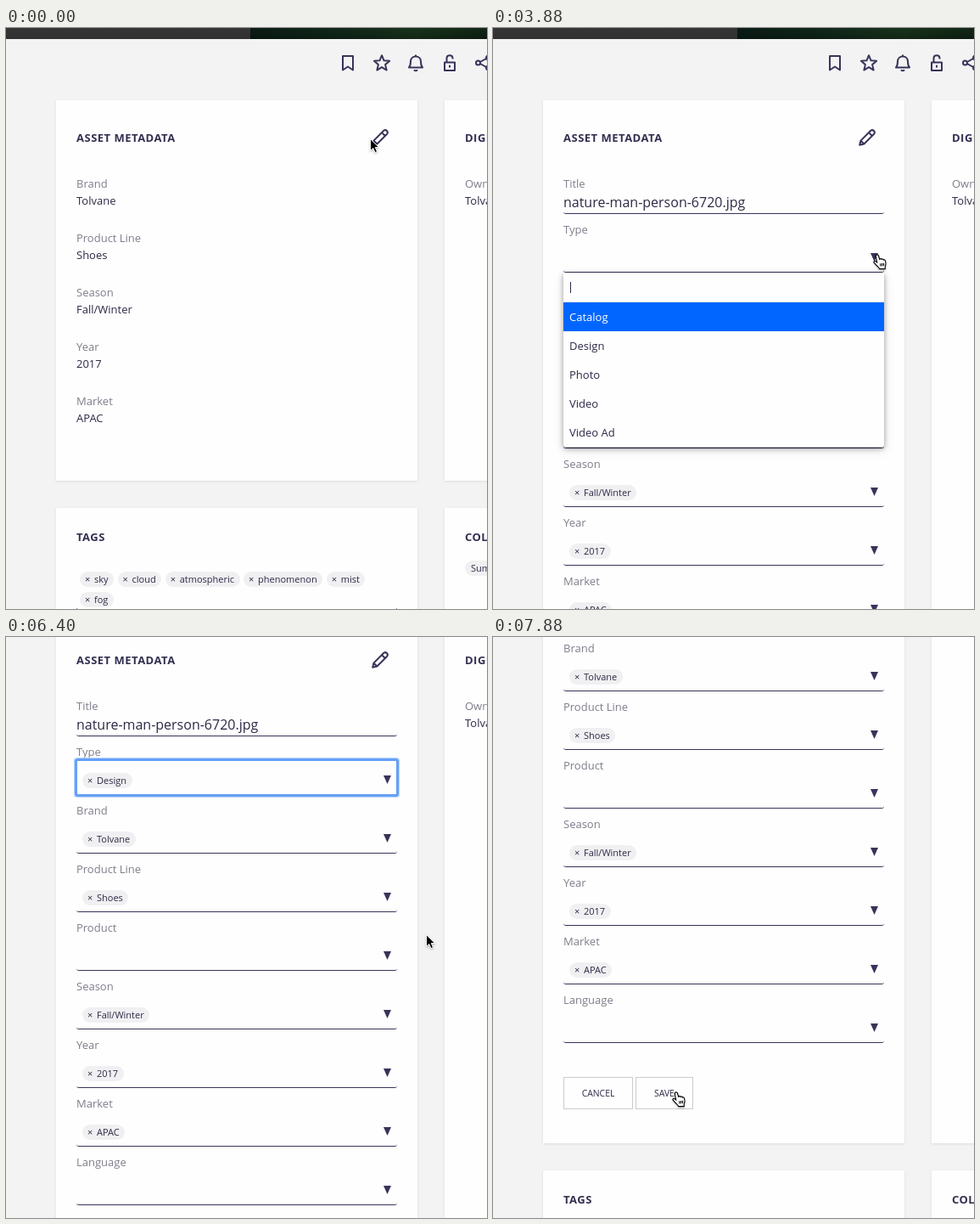
Animation, 567 px wide and 684 px high, one loop 8000 ms. Source, as an HTML page:

```html
<!DOCTYPE html>
<html lang="en">
<head>
<meta charset="utf-8">
<title>Asset metadata editor</title>
<style>
html, body { margin: 0; width: 100%; height: 100%; overflow: hidden; background: #f3f3f3; }
body { position: relative; font: 13px/20px "Open Sans", sans-serif; color: #2d2a45; }
#page { position: absolute; left: 0; top: 0; width: 567px; height: 1400px; }
#page div, #page svg, #cursors svg { position: absolute; }
.text { white-space: pre; height: 20px; }
.head { font-weight: 700; letter-spacing: .5px; color: #322f50; }
.label { color: #7f7d8b; }
.title { font-size: 16px; }
.card { background: #fefefe; box-shadow: 0 1px 3px rgba(0, 0, 0, .1); }
.field { box-sizing: border-box; left: 83px; width: 378px; border-bottom: 1px solid #37345a; border-radius: 3px; }
.arrow { left: 445px; width: 9px; height: 10px; background: #37345a; clip-path: polygon(0 0, 100% 0, 50% 100%); }
.chips { display: flex; gap: 4.5px; }
.chips span { height: 18px; line-height: 18px; padding: 0 6.5px 0 17px; border-radius: 9px; background: #f0f0f2; font-size: 11px; position: relative; }
.chips span::before { content: "×"; position: absolute; left: 6px; }
.chips .plain { padding-left: 7px; }
.chips .plain::before { content: none; }
.button { box-sizing: border-box; height: 38px; border: 1px solid #ccc; font-size: 10.4px; line-height: 36px; text-align: center; }
#ring { left: 81px; top: 245px; width: 376px; height: 39px; border: 3px solid #65a0f8; border-radius: 3px; box-shadow: 0 0 1px 1px #b5d1fb; }
#menu { left: 83px; top: 288px; width: 378px; background: #fefefe; border-radius: 0 0 3px 3px;
  box-shadow: 0 2px 6px rgba(0, 0, 0, .35), 0 4px 14px rgba(0, 0, 0, .1); }
#search { box-sizing: border-box; width: 378px; height: 35px; border-bottom: 1px solid #ebebeb; }
#caret { left: 8px; top: 11px; width: 1px; height: 13px; background: #2d2a45; }
.item { box-sizing: border-box; width: 378px; height: 34px; line-height: 34px; padding-left: 7px; }
.item.on { background: #06f; color: #fff; }
.icon { fill: none; stroke: #37345a; stroke-width: 2; stroke-linejoin: round; overflow: visible; }
#cursors svg { left: 0; top: 0; overflow: visible; filter: drop-shadow(0 1px 1px rgba(0, 0, 0, .3)); }
</style>
</head>
<body>
<div id="page"></div>
<div id="cursors">
  <svg id="pointer" width="12" height="18"><path d="M0 .5V14.5L3.3 11.5 5.5 16.6 8 15.5 5.8 10.6H10.2Z" fill="#000" stroke="#fff"/></svg>
  <svg id="hand" width="16" height="19"><path d="M3.9 1.2C4.9.4 6.1 1 6.4 2L7.7 6.2C8.3 5.4 9.7 5.5 10.1 6.4 10.9 5.8 12.1 6.1 12.4 7 13.3 6.6 14.2 7.1 14.4 8L15 11C15.2 12.7 14.4 13.6 14.2 15V17.6H7.6C7 16 5 14.6 3.6 12.8L1 9.9C.5 8.9 1.7 8 2.8 8.6L4.7 10 3.3 2.6C3.2 2 3.4 1.6 3.9 1.2ZM8.6 11.3 9 14.5M10.5 11 10.8 14.3M12.4 10.8 12.6 14" fill="#fff" stroke="#000" stroke-width="1.1"/></svg>
</div>
<script>
const LOOP = 8000;
const GROWTH = 356;
const BRAND = "Tolvane";

// Each table row is a start time followed by the values held from then on.
const CURSOR = [
  [0, "pointer", 429.5, 130], [590, "pointer", 432, 131], [740, "hand", 434, 131],
  [2840, "hand", 434, 152], [2990, "hand", 445, 238], [3130, "hand", 448, 266],
  [4480, "hand", 448, 274], [4630, "hand", 444, 302], [4780, "hand", 432, 343],
  [4930, "hand", 417, 368], [5060, "hand", 411, 371], [5210, "hand", 413, 370],
  [5660, "pointer", 472, 356], [5810, "pointer", 495.5, 350],
  [7300, "pointer", 488, 355], [7450, "pointer", 425, 400], [7600, "pointer", 315, 478],
  [7750, "hand", 224, 531], [7880, "hand", 211, 535]
];
const SCROLL = [[0, 0], [6250, 30], [6400, 102], [6550, 176], [6700, 232], [6850, 270], [7000, 289], [7150, 292], [7300, 293]];
const FORM = [[0, 0], [1640, .4], [1790, .75], [1940, .93], [2090, 1]];
const MENU = [[0, "closed"], [3580, "loading"], [3880, "Catalog"], [4930, "Design"], [5210, "closed"]];
const CARET = [[0, 1], [4030, 0], [4480, 1], [5060, 0]];
const RING = [[0, 0], [3430, 1], [3580, 0], [5210, 1]];
const CHOSEN = 5210;

const page = document.getElementById("page");

function add(parent, cls, style = {}, text = "") {
  const el = document.createElement("div");
  el.className = cls;
  el.textContent = text;
  for (const key in style) {
    const v = style[key];
    el.style[key] = typeof v === "number" ? v + "px" : v;
  }
  parent.append(el);
  return el;
}

const write = (parent, x, mid, text, cls = "") =>
  add(parent, "text " + cls, { left: x, top: mid - 10 }, text);

function chips(parent, x, mid, names, cls = "") {
  const row = add(parent, "chips", { left: x, top: mid - 9 });
  for (const name of names) {
    const chip = document.createElement("span");
    chip.className = cls;
    chip.textContent = name;
    row.append(chip);
  }
  return row;
}

function icon(x, y, d) {
  page.insertAdjacentHTML("beforeend",
    `<svg class="icon" style="left:${x}px;top:${y}px" width="22" height="22"><path d="${d}"/></svg>`);
}

function starPath(r, inner) {
  const points = Array.from({ length: 10 }, (_, i) => {
    const a = i * Math.PI / 5, s = i % 2 ? inner : r;
    return (10 + s * Math.sin(a)).toFixed(2) + " " + (10.8 - s * Math.cos(a)).toFixed(2);
  });
  return "M" + points.join("L") + "Z";
}

// Banner and toolbar
add(page, "", { left: 0, top: 0, width: 288, height: 13, background: "linear-gradient(#363636, #303030)" });
add(page, "", { left: 288, top: 0, width: 279, height: 13,
  background: "linear-gradient(rgba(0,0,0,.1), rgba(0,0,0,.35)), linear-gradient(90deg, #0c2018, #14301f 45%, #1b3a1e 70%, #142a18)" });
icon(396, 32, "M1 1H13V17.5L7 13.5 1 17.5Z");
icon(433, 31, starPath(9.6, 4.3));
icon(473, 31, "M2 15.5H18C16.5 14 16 12 16 8.5 16 5 13.5 2.5 10 2.5S4 5 4 8.5C4 12 3.5 14 2 15.5ZM10 .5V2.5M8 18.3C9 19.6 11 19.6 12 18.3");
icon(513, 31, "M4 9.5H16V19H4ZM6.5 9.5V4.5C6.5 0 13.5 0 13.5 4.5V5.5M10 12.8V15.6");
icon(553, 31, "M6 10A2.5 2.5 0 1 1 1 10 2.5 2.5 0 1 1 6 10ZM6 9 13 5M6 11 13 15M18 4A2.5 2.5 0 1 1 13 4 2.5 2.5 0 1 1 18 4ZM18 16A2.5 2.5 0 1 1 13 16 2.5 2.5 0 1 1 18 16Z");

// Upper cards
const tall = [59, 517].map(x => add(page, "card", { left: x, top: 85, width: 426, height: 448 }));
write(page, 83, 129, "ASSET METADATA", "head");
write(page, 541, 129, "DIGITAL RIGHTS", "head");
write(page, 541, 183, "Owner", "label");
write(page, 541, 203, BRAND);
icon(431, 119, "M1.2 18.8 2.5 13.6 14.3 1.8C16.8-.2 20.2 3.2 18.2 5.7L6.4 17.5ZM12 4.1 15.9 8M2.5 13.6 6.4 17.5");

// Lower cards
const lower = add(page, "", { left: 0, top: 0 });
for (const x of [59, 517]) add(lower, "card", { left: x, top: 565, width: 426, height: 400 });
write(lower, 83, 599, "TAGS", "head");
write(lower, 541, 599, "COLLECTIONS", "head");
add(lower, "field", { top: 640, height: 45 });
chips(lower, 87, 648.5, ["sky", "cloud", "atmospheric", "phenomenon", "mist"]);
chips(lower, 87, 672.5, ["fog"]);
chips(lower, 541, 635.5, ["Summer"], "plain");

// Read-only view
const view = add(page, "", { left: 0, top: 0 });
[["Brand", BRAND], ["Product Line", "Shoes"], ["Season", "Fall/Winter"], ["Year", "2017"], ["Market", "APAC"]]
  .forEach(([name, value], i) => {
    write(view, 83, 183 + 64 * i, name, "label");
    write(view, 83, 203 + 64 * i, value);
  });

// Edit form
const form = add(page, "", { left: 0, top: 0 });
write(form, 83, 183, "Title", "label");
write(form, 83, 205, "nature-man-person-6720.jpg", "title");
add(form, "field", { top: 190, height: 29 });
let typeChip;
[["Type", "Design"], ["Brand", BRAND], ["Product Line", "Shoes"], ["Product"], ["Season", "Fall/Winter"],
  ["Year", "2017"], ["Market", "APAC"], ["Language"]].forEach(([name, value], i) => {
  const y = 237 + 69 * i;
  write(form, 83, y, name, "label");
  add(form, "field", { top: y + 11, height: 40 });
  add(form, "arrow", { top: y + 28 });
  const chip = value && chips(form, 90, y + 34, [value]);
  if (name === "Type") typeChip = chip;
});
add(form, "button", { left: 83, top: 811, width: 82 }, "CANCEL");
add(form, "button", { left: 168, top: 811, width: 68 }, "SAVE");
const ring = add(form, "");
ring.id = "ring";

// Type menu
const menu = add(form, "");
menu.id = "menu";
const search = add(menu, "");
search.id = "search";
const caret = add(search, "");
caret.id = "caret";
const items = ["Catalog", "Design", "Photo", "Video", "Video Ad"]
  .map((name, i) => add(menu, "item", { top: 35 + 34 * i }, name));
const loading = add(menu, "item label", { top: 35 }, "Searching…");

const cursors = { pointer: document.getElementById("pointer"), hand: document.getElementById("hand") };
const show = (el, on) => { el.style.visibility = on ? "visible" : "hidden"; };

function at(table, t) {
  let row = table[0];
  for (const next of table) if (next[0] <= t) row = next;
  return row.slice(1);
}

function draw(t) {
  const [opacity] = at(FORM, t);
  const editing = opacity > 0;
  view.style.display = editing ? "none" : "block";
  form.style.display = editing ? "block" : "none";
  form.style.opacity = opacity;
  for (const card of tall) card.style.height = 448 + (editing ? GROWTH : 0) + "px";
  lower.style.top = (editing ? GROWTH : 0) + "px";

  const [state] = at(MENU, t);
  const busy = state === "loading";
  menu.style.display = state === "closed" ? "none" : "block";
  menu.style.height = (busy ? 69 : 205) + "px";
  loading.style.display = busy ? "block" : "none";
  for (const item of items) {
    item.style.display = busy ? "none" : "block";
    item.classList.toggle("on", item.textContent === state);
  }
  caret.style.opacity = at(CARET, t)[0];
  show(ring, at(RING, t)[0]);
  show(typeChip, t >= CHOSEN);

  page.style.top = -at(SCROLL, t)[0] + "px";
  const [kind, x, y] = at(CURSOR, t);
  for (const name in cursors) show(cursors[name], name === kind);
  cursors[kind].style.transform = `translate(${x}px, ${y}px)`;
}

const start = performance.now();
function tick() {
  draw((performance.now() - start) % LOOP);
  requestAnimationFrame(tick);
}
tick();
</script>
</body>
</html>
```
